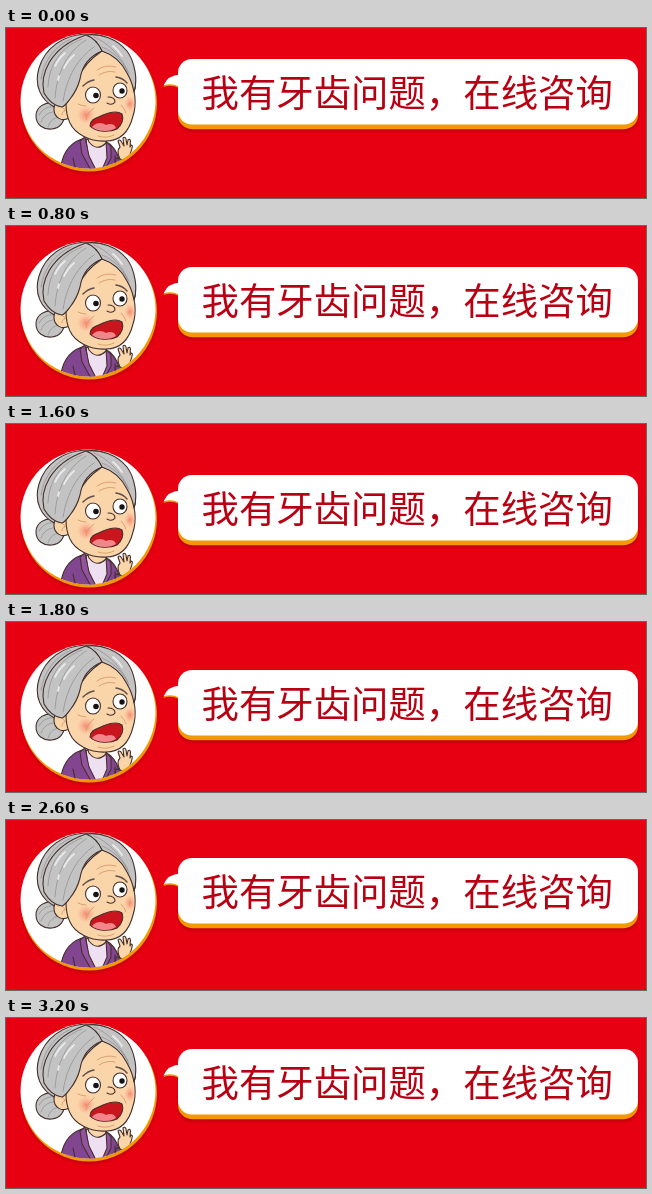
These frames come from a looping animation (640 px wide and 170 px high, 3.4 s). An HTML page:

```html
<!DOCTYPE html>
<html lang="zh-CN">
<head>
<meta charset="utf-8">
<title>在线咨询</title>
<style>
  html, body { margin: 0; width: 100%; height: 100%; overflow: hidden; background: #e70012; }
  svg { display: block; width: 640px; height: 170px; }
  text { font: 350 37.4px "Noto Sans CJK SC", "Noto Sans CJK", sans-serif; fill: #b90012; }
  .ink { stroke: #43302c; stroke-width: 1.1; stroke-linejoin: round; stroke-linecap: round; }
  .line { fill: none; }
  .skin { fill: #fbd5aa; }
  .hair { fill: #c3c3c4; }
  .strand, .shine { fill: none; stroke: #939395; stroke-width: .8; stroke-linecap: round; }
  .shine { stroke: #e9e9ea; stroke-width: 1.8; }
  .crease { fill: none; stroke: #d89a68; stroke-width: .9; stroke-linecap: round; }
</style>
</head>
<body>
<svg viewBox="0 0 640 170">
  <defs>
    <clipPath id="disc"><circle cx="82" cy="73" r="67.500"/></clipPath>
    <radialGradient id="blush">
      <stop offset="0" stop-color="#f5806c" stop-opacity=".9"/>
      <stop offset="1" stop-color="#f9a184" stop-opacity="0"/>
    </radialGradient>
    <filter id="soft" x="-10%" y="-10%" width="120%" height="125%">
      <feGaussianBlur stdDeviation="1.6"/>
    </filter>
    <rect id="bubble" x="172" y="31" width="460" height="65.600" rx="14"/>
    <path id="tail" d="M190 46.500H174Q162 47 157.500 57.500Q165 54.500 173 58.500H190Z"/>
  </defs>

  <g id="mover">
    <g fill="#9c0008" opacity=".5" filter="url(#soft)">
      <circle cx="83" cy="77.500" r="68"/>
      <use href="#bubble" y="7"/>
    </g>
    <g fill="#f39800">
      <circle cx="83" cy="75.500" r="68"/>
      <use href="#bubble" y="4.600"/>
      <use href="#tail" y="1.500"/>
    </g>
    <g fill="#fff">
      <circle cx="82" cy="73" r="67.500"/>
      <use href="#bubble"/>
      <use href="#tail"/>
    </g>
    <text x="195.500" y="78.700">我有牙齿问题，在线咨询</text>

    <g clip-path="url(#disc)">
      <!-- clothes -->
      <path class="ink" fill="#824590" d="M54 143C56 128 61 116 76 111L99 113C107 117 111 124 113 131L114 146H54Z"/>
      <path class="ink" fill="#efe0f1" d="M80 111L82 127L88 143H98L104 129L100 113Z"/>
      <path class="ink skin" d="M80 106L83 114Q91 124 100 115V108Z"/>
      <path class="ink" fill="#93529f" d="M79 109L74 113L76 126L86 144H91L83 128Z"/>
      <path class="ink" fill="#93529f" d="M100 113L105 119L105 130L98 144H95L101 130Z"/>
      <path class="ink line" d="M67 130L70 144M109 128L109 142"/>

      <!-- hand -->
      <path class="ink skin" d="M114 131C111 125 112 121 114 119L112 113Q113 111 115 113L118 118L117 110Q119 108 120 111L121 117L122 112Q124 110 124.500 113L124 119L125 117Q127 117 126 120C125 126 122 130 120 134Z"/>
      <path class="ink" fill="#824590" d="M110 130L121 133L119 143H108Z"/>

      <!-- bun and hair -->
      <path class="ink hair" d="M50 75C39 73 30 79 30 88C30 97 38 102 46 101C54 100 59 94 58 86Z"/>
      <path class="strand" d="M33 87C37 80 43 78 50 79M35 94C38 86 44 83 52 84M42 99C44 92 49 89 55 89"/>
      <path class="ink hair" d="M50 80C34 72 28 57 33 40C39 20 57 7 79 6C105 5 121 20 127 40C130 50 130 59 128 64L111 47L92 24L60 78Z"/>

      <!-- face -->
      <path class="ink skin" d="M61 76C56 69 48 73 48 81C48 90 56 94 63 90Z"/>
      <path class="crease" d="M52 79Q57 77 59 83Q56 83 56 87"/>
      <path class="ink skin" d="M96 23C106 25 118 35 124 49C129 61 131 76 127 88C123 104 114 113 100 113C84 114 69 106 64 95C61 89 60 82 60 76C65 67 69 60 72 51C76 40 84 31 96 23Z"/>
      <path class="ink hair" d="M80 7C87 10 92 15 96 23C108 27 116 35 121 45C125 52 127 58 128 64C132 52 129 34 121 23C111 11 95 5 80 7Z"/>
      <path class="ink hair" d="M80 7C88 10 93 16 96 23C84 28 76 38 74 51C72 59 68 66 64 71C61 75 59 78 56 79C47 78 42 72 38 65C34 48 42 20 80 7Z"/>
      <path class="strand" d="M76 11C55 19 43 36 42 59M80 12C64 22 51 41 49 70M88 19C72 30 61 48 57 73M65 11C49 18 38 32 35 51M88 9C101 14 114 27 122 43M96 19C108 24 117 33 123 46"/>
      <path class="shine" d="M49 38Q53 30 59 25M58 40Q62 32 68 27M53 48L52 52M107 18Q113 23 116 28"/>
      <circle cx="80" cy="87" r="9" fill="url(#blush)"/>
      <ellipse cx="124" cy="76" rx="6" ry="8" fill="url(#blush)"/>
      <path class="crease" d="M91 42Q99 36 110 39M93 47Q101 42 109 44M72 76Q76 78 80 78M115 77Q119 81 120 85M88 80Q82 84 80 92"/>

      <!-- eyes, brows, nose -->
      <g class="ink" fill="#fff">
        <ellipse cx="87" cy="67" rx="7.500" ry="8"/>
        <ellipse cx="114" cy="62.500" rx="7" ry="7.500"/>
      </g>
      <g fill="#171313">
        <circle cx="90" cy="67.500" r="2.800"/>
        <circle cx="116" cy="63" r="2.700"/>
      </g>
      <path class="line" stroke="#5e504b" stroke-width="1.500" stroke-linecap="round" d="M77 58Q82 53 88 52M110 49Q117 50 121 55"/>
      <path class="ink line" d="M102 69Q109 69 109 74Q106 78 101 75"/>

      <!-- mouth -->
      <path class="ink" fill="#c9161e" d="M84 98C84 91 91 90 97 87C104 84 112 83 116 86C118 91 116 97 111 101C105 104 90 105 84 98Z"/>
      <path fill="#f4868b" d="M86 99C90 94 96 94 100 97C104 95 109 96 110 100C104 104 92 104 86 99Z"/>
      <path class="crease" d="M92 108Q100 111 108 107"/>
    </g>
  </g>
</svg>
<script>
  const STEP = 200, HALF = 8, RISE = 2.5, COUNT = 17;

  // Whole-pixel steps: down for the first half, back up for the second.
  const drop = i => i <= HALF
    ? Math.round(i * RISE)
    : HALF * RISE - Math.round((i - HALF) * RISE);

  const frames = Array.from({ length: COUNT + 1 }, (_, i) => ({
    offset: i / COUNT,
    transform: `translateY(${drop(Math.min(i, COUNT - 1))}px)`,
    easing: "steps(1, end)"
  }));

  document.getElementById("mover").animate(frames, {
    duration: STEP * COUNT,
    iterations: Infinity
  });
</script>
</body>
</html>
```
